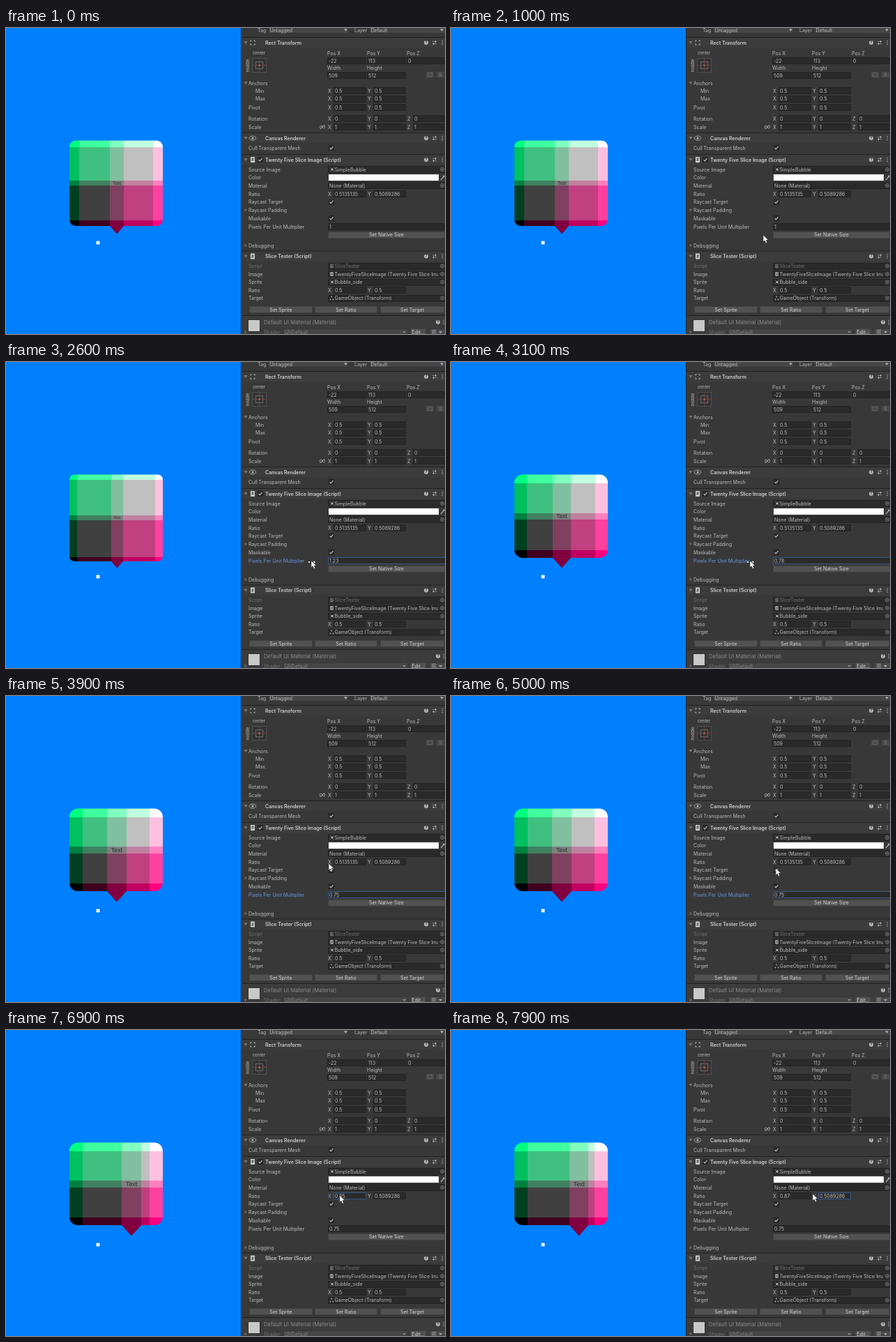
Animation of 630 by 439 pixels, one loop 8000 ms. Source, as an HTML page with a canvas:

```html
<!DOCTYPE html>
<html lang="en">
<head>
<meta charset="utf-8">
<title>Slice image inspector</title>
<style>
  html, body { margin: 0; width: 100%; height: 100%; overflow: hidden; background: #0080ff; }
  canvas { display: block; }
</style>
</head>
<body>
<canvas id="stage" width="630" height="439"></canvas>
<script>
const ctx = document.getElementById('stage').getContext('2d');
const LOOP = 8000, STEP = 100;
const LABEL = '#bcbcbc', DIM = '#727272', BLUE = '#6a95e2', EDGE = '#242424';

// Each key is [time, ...values]; values run linearly between keys.
const MULTIPLIER = [[1300, 1], [1500, 1.22], [1700, 1.48], [1850, 1.5], [2100, 1.27], [2500, 1.27],
  [2600, 1.23], [3100, .78], [3400, .75]];
const RATIO = [[5500, .5135135], [5800, .24], [6000, .14], [6150, .2], [6300, .31], [6900, .85], [7000, .87]];
const POINTER = [[100, 612, 428], [700, 490, 330], [1100, 434, 286], [1300, 434, 285], [1700, 443, 284],
  [2100, 439, 285], [2500, 439, 285], [2600, 438, 285], [3100, 429, 285], [3500, 428, 285],
  [3900, 463, 240], [4400, 508, 238], [5000, 466, 247], [5400, 468, 238], [6000, 454, 238],
  [6300, 460, 238], [7000, 482, 237], [7600, 519, 235]];

function track(keys, t) {
  const next = keys.findIndex(k => k[0] > t);
  if (next < 0) return keys[keys.length - 1].slice(1);
  if (next === 0) return keys[0].slice(1);
  const a = keys[next - 1], b = keys[next], f = (t - a[0]) / (b[0] - a[0]);
  return a.slice(1).map((v, i) => v + (b[i + 1] - v) * f);
}

function box(x, y, w, h, fill, stroke) {
  ctx.fillStyle = fill;
  ctx.fillRect(x, y, w, h);
  if (stroke) {
    ctx.strokeStyle = stroke;
    ctx.lineWidth = 1;
    ctx.strokeRect(x + .5, y + .5, w - 1, h - 1);
  }
}

function text(str, x, y, color = LABEL, { size = 7, weight = 400, align = 'left', family = 'Inter' } = {}) {
  ctx.font = `${weight} ${size}px ${family}, sans-serif`;
  ctx.textAlign = align;
  ctx.textBaseline = 'alphabetic';
  ctx.fillStyle = color;
  ctx.fillText(str, x, y + size * .36);
}

function shape(points, fill) {
  ctx.beginPath();
  points.forEach(([x, y]) => ctx.lineTo(x, y));
  ctx.closePath();
  ctx.fillStyle = fill;
  ctx.fill();
}

function line(points, color, width = 1) {
  ctx.beginPath();
  points.forEach(([x, y]) => ctx.lineTo(x, y));
  ctx.strokeStyle = color;
  ctx.lineWidth = width;
  ctx.stroke();
}

function ring(x, y, r, color, width = .8) {
  ctx.beginPath();
  ctx.arc(x, y, r, 0, 7);
  ctx.strokeStyle = color;
  ctx.lineWidth = width;
  ctx.stroke();
}

function dot(x, y, r, color) {
  ctx.beginPath();
  ctx.arc(x, y, r, 0, 7);
  ctx.fillStyle = color;
  ctx.fill();
}

function foldout(y, open) {
  shape(open ? [[341.5, y - 2], [346.5, y - 2], [344, y + 2]] : [[342.5, y - 2.5], [342.5, y + 2.5], [346, y]],
    open ? '#777' : '#686868');
}

function field(x, y, w, value, focus) {
  box(x, Math.round(y - 5), w, 10, '#2a2a2a', focus ? '#34598a' : EDGE);
  text(value, x + 2, y);
}

function axis(name, x, y, value, focus) {
  text(name, x + 1, y, focus ? BLUE : LABEL);
  field(x + 9, y, 47, value, focus);
}

function objectField(y, value, color = LABEL) {
  box(462, Math.round(y - 5), 169, 10, '#2a2a2a', EDGE);
  ctx.save();
  ctx.beginPath();
  ctx.rect(462, y - 6, 158, 12);
  ctx.clip();
  text(value, value.startsWith('None') ? 464 : 471.5, y, color);
  ctx.restore();
  ring(626, y, 2.6, '#888');
  dot(626, y, 1, '#888');
}

function spriteIcon(y) {
  box(466.5, y - 1.5, 3, 3, '#b0b0b0');
  [[465, -3], [470, -3], [465, 2], [470, 2]].forEach(([x, d]) => box(x, y + d, 1, 1, '#777'));
}

function scriptIcon(x, y, s, color) {
  box(x - 3 * s, y - 4 * s, 6 * s, 8 * s, color);
  text('#', x, y, '#444', { size: 6 * s, weight: 700, align: 'center' });
}

function check(x, y) {
  box(x - 4, Math.round(y - 4), 8, 8, '#2a2a2a', EDGE);
  line([[x - 2.4, y], [x - .7, y + 1.9], [x + 2.6, y - 2]], '#d0d0d0', 1.1);
}

function button(x, y, w, label) {
  box(x, Math.round(y - 5), w, 10, '#515151', '#404040');
  text(label, x + w / 2, y, '#d4d4d4', { align: 'center' });
}

function help(x, y) {
  dot(x, y, 3, '#b8b8b8');
  text('?', x, y, '#333', { size: 5.5, weight: 700, align: 'center' });
}

function dots(x, y) {
  [-2.5, 0, 2.5].forEach(d => box(x, y + d - .6, 1.2, 1.2, '#b8b8b8'));
}

function header(y, title) {
  box(338, y - 8, 292, 15, '#3c3c3c');
  box(338, y - 8, 292, 1, '#222');
  foldout(y, true);
  text(title, 372, y, '#d0d0d0', { weight: 600 });
  help(603, y);
  for (const [d, knob] of [[-1.6, 616.5], [1.6, 613.5]]) {
    line([[612, y + d], [618, y + d]], '#a0a0a0', .8);
    line([[knob, y + d - 1.4], [knob, y + d + 1.4]], '#c0c0c0');
  }
  dots(625.5, y);
}

function anchorPreset() {
  text('center', 363, 36, LABEL, { size: 6, align: 'center' });
  ctx.save();
  ctx.translate(347, 54);
  ctx.rotate(-Math.PI / 2);
  text('middle', 0, 0, LABEL, { size: 6, align: 'center' });
  ctx.restore();
  box(353, 43, 21, 21, '#323232', '#505050');
  box(358, 48, 11, 11, '#323232', '#6c6c6c');
  line([[363.5, 44], [363.5, 63]], '#74403f');
  line([[354, 53.5], [373, 53.5]], '#74403f');
  box(362.5, 52.5, 2, 2, '#a88058');
}

function rectTransform() {
  header(21, 'Rect Transform');
  [[-1, -1], [1, -1], [1, 1], [-1, 1]].forEach(([x, y]) => {
    shape([[354 + 3.5 * x, 21 + 3.5 * y], [354 + x, 21 + 3.5 * y], [354 + 3.5 * x, 21 + y]], '#b8b8b8');
  });
  anchorPreset();
  const xs = [461, 518, 575];
  ['Pos X', 'Pos Y', 'Pos Z'].forEach((s, i) => text(s, xs[i], 36.5));
  ['-22', '113', '0'].forEach((s, i) => field(xs[i], 47, 56, s));
  ['Width', 'Height'].forEach((s, i) => text(s, xs[i], 57.5));
  ['509', '512'].forEach((s, i) => field(xs[i], 68, 56, s));
  box(602, 62, 13, 10, '#484848', '#3a3a3a');
  ctx.setLineDash([1, 1]);
  ctx.strokeStyle = '#777';
  ctx.strokeRect(605.5, 64.5, 6, 5);
  ctx.setLineDash([]);
  box(617, 62, 13, 10, '#484848', '#3a3a3a');
  text('R', 623.5, 67, '#777', { align: 'center' });

  foldout(79, true);
  text('Anchors', 348, 79);
  [['Min', 358, 90, '0.5'], ['Max', 358, 101.5, '0.5'], ['Pivot', 348, 114, '0.5'],
    ['Rotation', 348, 130, '0', 3], ['Scale', 348, 142, '1', 3]].forEach(([name, x, y, value, axes = 2]) => {
    text(name, x, y);
    for (let i = 0; i < axes; i++) axis('XYZ'[i], xs[i], y, value);
  });
  ring(452, 142, 1.8, '#aaa');
  ring(456, 142, 1.8, '#aaa');
  line([[450.5, 145], [457.5, 139]], '#aaa', .8);
}

function sliceImage(m, ratio, focus) {
  header(158, 'Canvas Renderer');
  ctx.beginPath();
  ctx.ellipse(354, 158, 4.5, 3, 0, 0, 7);
  ctx.strokeStyle = '#b8b8b8';
  ctx.lineWidth = .8;
  ctx.stroke();
  dot(354, 158, 1.5, '#b8b8b8');
  text('Cull Transparent Mesh', 348, 172);
  check(467, 172);

  header(189, 'Twenty Five Slice Image (Script)');
  scriptIcon(354, 189, 1, '#d0d0d0');
  check(365, 189);
  text('Source Image', 348, 203);
  objectField(203, 'SimpleBubble');
  spriteIcon(203);
  text('Color', 348, 214.5);
  box(463, 210, 158, 9, '#fff');
  line([[624, 218], [628, 213.5]], '#aaa', 1.2);
  dot(628.3, 212.8, 1.4, '#aaa');
  text('Material', 348, 226);
  objectField(226, 'None (Material)');
  text('Ratio', 348, 238);
  axis('X', 461, 238, ratio, focus === 'x');
  axis('Y', 518, 238, '0.5089286', focus === 'y');
  text('Raycast Target', 348, 249.5);
  check(467, 249.5);
  foldout(261, false);
  text('Raycast Padding', 348, 261);
  text('Maskable', 348, 273);
  check(467, 273);
  text('Pixels Per Unit Multiplier', 348, 285, focus === 'm' ? BLUE : LABEL);
  field(462, 285, 169, m, focus === 'm');
  button(462, 296.5, 168, 'Set Native Size');
  foldout(312, false);
  text('Debugging', 348, 312);
}

function sliceTester() {
  header(327.5, 'Slice Tester (Script)');
  scriptIcon(354, 327.5, 1, '#d0d0d0');
  text('Script', 348, 341.5, DIM);
  objectField(341.5, 'SliceTester', DIM);
  scriptIcon(467.5, 341.5, .7, '#777');
  text('Image', 348, 353);
  objectField(353, 'TwentyFiveSliceImage (Twenty Five Slice Image)');
  scriptIcon(467.5, 353, .7, '#bbb');
  text('Sprite', 348, 364.5);
  objectField(364.5, 'Bubble_side');
  spriteIcon(364.5);
  text('Ratio', 348, 376);
  axis('X', 461, 376, '0.5');
  axis('Y', 518, 376, '0.5');
  text('Target', 348, 387.5);
  objectField(387.5, 'GameObject (Transform)');
  [[467, 385.5], [465.5, 389.5], [469.5, 389.5]].forEach(([x, y]) => dot(x, y, .9, '#b0b0b0'));
  button(349, 404, 91, 'Set Sprite');
  button(443, 404, 90, 'Set Ratio');
  button(537, 404, 92, 'Set Target');
}

function materialFooter() {
  box(338, 413, 292, 26, '#3c3c3c');
  box(338, 412, 292, 1, '#222');
  box(347, 418, 18, 18, '#c8c8c8', '#303030');
  text('Default UI Material (Material)', 370, 422, '#8a8a8a', { size: 7.7 });
  help(620, 422);
  dots(627.5, 422);
  foldout(436, false);
  text('Shader', 370, 436, DIM);
  box(397, 431, 180, 10, '#464646', '#363636');
  text('UI/Default', 400, 436, '#808080');
  shape([[569, 435], [574, 435], [571.5, 438]], '#888');
  button(580, 436, 23, 'Edit...');
  box(607, 431, 24, 10, '#4a4a4a', '#383838');
  [433.5, 435.5, 437.5].forEach(y => line([[611, y], [617, y]], '#aaa', .8));
  shape([[621, 435], [626, 435], [623.5, 438]], '#aaa');
}

function panel(m, ratio, focus) {
  box(337, 0, 293, 439, '#383838');
  box(337, 0, 1, 439, '#252525');
  text('Tag', 361, 3);
  box(376, -3, 116, 11, '#464646', '#363636');
  text('Untagged', 378.5, 3);
  shape([[485, 1.5], [490, 1.5], [487.5, 4.5]], '#bbb');
  text('Layer', 500, 3);
  box(521, -3, 110, 11, '#464646', '#363636');
  text('Default', 523.5, 3);
  shape([[623, 1.5], [628, 1.5], [625.5, 4.5]], '#bbb');
  rectTransform();
  sliceImage(m, ratio, focus);
  sliceTester();
  materialFooter();
}

// Turns five slice sizes into six rounded edges.
function edges(start, sizes) {
  const out = [start];
  sizes.forEach(s => out.push(out[out.length - 1] + s));
  return out.map(Math.round);
}

function bubble(m, ratio) {
  const left = 91, top = 161.4, width = 134, height = 134, ratioY = .5089286;
  const corner = 14 / m, mid = 20.5 / m, capTop = 9.8 / m, midY = 7.5 / m, capLow = 8 / m, tail = 11.5 / m;
  const freeX = width - 2 * corner - mid;
  const freeY = height - capTop - midY - capLow - tail;
  const xs = edges(left, [corner, freeX * ratio, mid, freeX * (1 - ratio), corner]);
  const ys = edges(top, [capTop, freeY * (1 - ratioY), midY, freeY * ratioY, capLow]);
  const cx = left + corner + freeX * ratio + mid / 2;
  const cy = top + capTop + freeY * (1 - ratioY) + midY / 2;

  ctx.save();
  ctx.beginPath();
  ctx.roundRect(left, top, width, ys[5] - top, 9 / m);
  ctx.clip();
  for (let row = 0; row < 5; row++) {
    for (let col = 0; col < 5; col++) {
      const r = Math.min(255, col * 64), g = Math.min(255, (4 - row) * 64);
      box(xs[col], ys[row], xs[col + 1] - xs[col], ys[row + 1] - ys[row], `rgb(${r},${g},${(r + g) >> 1})`);
    }
  }
  ctx.restore();
  shape([[xs[2], ys[5]], [xs[3], ys[5]], [cx, top + height]], '#800040');
  text('Text', cx, cy, '#2c2c2c', { size: 6.6 / m, align: 'center', family: 'Liberation Sans' });
}

function pointer(x, y, scrubbing) {
  if (scrubbing) {
    dot(x - 3, y + 2, 1.1, '#fff');
    shape([[x + 6, y + 2], [x + 3.5, y], [x + 3.5, y + 4]], '#fff');
  }
  const arrow = [[0, 0], [0, 10], [2.3, 8], [4, 11.8], [5.8, 11], [4.2, 7.3], [7.3, 7.1]]
    .map(([dx, dy]) => [x + dx, y + dy]);
  shape(arrow, '#fff');
  line([...arrow, arrow[0]], '#222', .6);
}

function draw(t) {
  const [m] = track(MULTIPLIER, t);
  const [ratio] = track(RATIO, t);
  const [shownRatio] = track(RATIO, t - 35);
  const focus = t >= 7500 ? 'y' : t >= 5500 ? 'x' : t >= 1300 ? 'm' : '';
  const ratioText = t <= 5500 ? '0.5135135' : String(+ratio.toFixed(2));

  box(0, 0, 630, 439, '#0080ff');
  bubble(m, shownRatio);
  box(129.6, 305.6, 4.8, 4.8, '#fff');
  panel(String(+m.toFixed(2)), ratioText, focus);
  if (t >= 100) pointer(...track(POINTER, t), t >= 1100 && t < 3500);
}

function tick() {
  const t = performance.now() % LOOP;
  draw(Math.floor(t / STEP) * STEP);
  requestAnimationFrame(tick);
}
tick();
</script>
</body>
</html>
```
